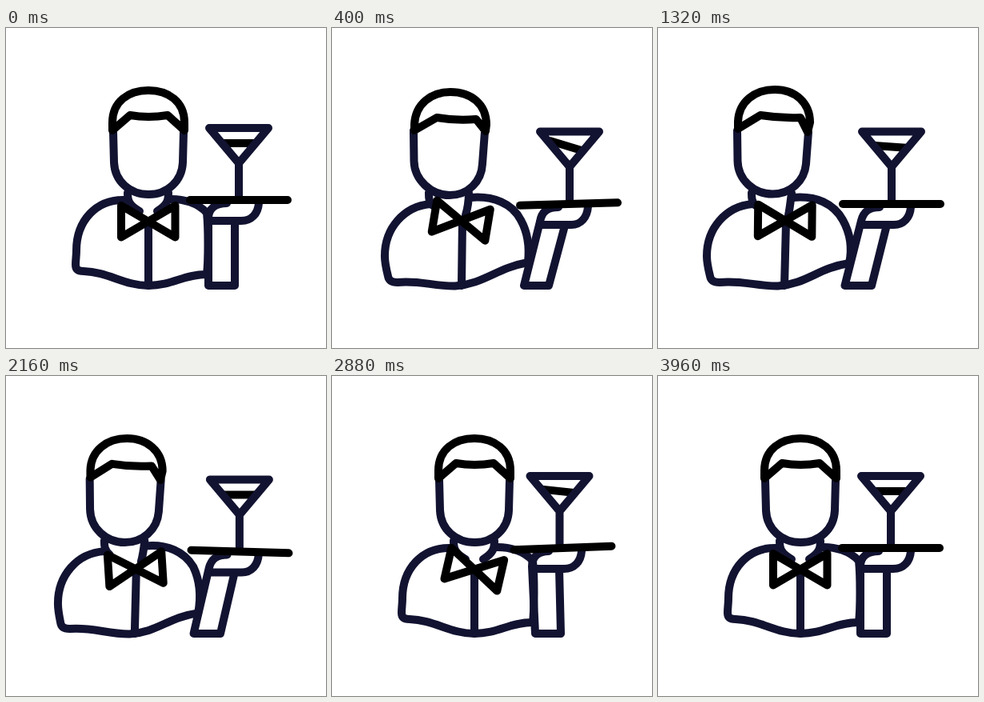
An HTML page without scripts for the animation above (4400 ms loop, 400 by 400 pixels).

```html
<!DOCTYPE html>
<html lang="en">
<head>
<meta charset="utf-8">
<title>Waiter</title>
<style>
html, body { margin: 0; width: 100%; height: 100%; overflow: hidden; background: #fff; }
svg { display: block; width: 100vw; height: 100vh; }
path, line {
  fill: none; stroke: #121331; stroke-width: 10;
  stroke-linecap: round; stroke-linejoin: round;
}
.dark { stroke: #000; }

/* Each part gives its own outline for: rest, going left, left, going back */
.pose  { animation: pose 4.4s infinite linear; }
.arm   { animation: arm 4.4s infinite linear; }
.glass { animation: glass 4.4s infinite ease-in-out; }
.tray  { animation: tray 4.4s infinite ease-in-out; }
.fluid { animation: slosh 4.4s infinite ease-in-out; transform-origin: 291px 144px; }
.tie   { animation: lean 4.4s infinite linear, swing 4.4s infinite ease-in-out; }

@keyframes pose {
  0%, 86.8%, 100% { d: var(--rest); }
  1.4%  { d: var(--rest); animation-timing-function: cubic-bezier(.35,.1,.7,.85); }
  9.1%  { d: var(--go); animation-timing-function: cubic-bezier(.2,.6,.6,1); }
  14.1% { d: var(--left); }
  46.8% { d: var(--left); animation-timing-function: cubic-bezier(.35,.1,.7,.85); }
  54.5% { d: var(--back); animation-timing-function: cubic-bezier(.2,.6,.6,1); }
  59.5% { d: var(--rest); }
}
@keyframes arm {
  0%, 72.7%, 100% { d: var(--rest); }
  1.4%  { d: var(--rest); }
  9.1%  { d: var(--go); animation-timing-function: ease-out; }
  14.1%, 15% { d: var(--far); animation-timing-function: ease-in-out; }
  27.3%, 48.5% { d: var(--left); }
  54.5% { d: var(--back); animation-timing-function: ease-out; }
  59.5%, 65.5% { d: var(--near); animation-timing-function: ease-in-out; }
}
@keyframes glass {
  0%, 1.4%, 72.7%, 100% { translate: 0 0; }
  9.1%  { translate: 6px 4.5px; animation-timing-function: ease-out; }
  14.1%, 15% { translate: 9px 5px; }
  27.3%, 48.5% { translate: 1px 4.5px; }
  54.5% { translate: -5px 1px; animation-timing-function: ease-out; }
  59.5%, 60.5% { translate: -8px 0; }
  65.5% { translate: -6.5px 0; }
}
@keyframes tray {
  0%, 1.4%, 72.7%, 100% { translate: 291px 215px; rotate: 0deg; }
  9.1%  { translate: 296px 220px; rotate: -1.6deg; }
  14.1%, 15% { translate: 300px 220px; rotate: 0deg; }
  27.3%, 46.8% { translate: 292px 220px; rotate: 0deg; }
  49.1% { translate: 292.5px 219.5px; rotate: 1.7deg; }
  54.5% { translate: 290px 216.5px; rotate: .5deg; }
  59.5% { translate: 287.5px 215px; rotate: -1.5deg; }
  65.5% { translate: 288.5px 215px; rotate: -2.2deg; }
}
@keyframes slosh {
  0%, 1.4%, 90%, 100% { rotate: 0deg; }
  9.1%  { rotate: 17deg; }
  20.5% { rotate: -10deg; }
  31.8% { rotate: 5deg; }
  38.6% { rotate: -3deg; }
  42.7%, 49.1% { rotate: 0deg; }
  55%   { rotate: 10deg; }
  65.5% { rotate: 6deg; }
  75%   { rotate: -11deg; }
  82.7% { rotate: 5deg; }
}
@keyframes lean {
  0%, 86.8%, 100% { translate: 178px 242px; }
  1.4%  { translate: 178px 242px; animation-timing-function: cubic-bezier(.35,.1,.7,.85); }
  9.1%  { translate: 161.5px 241px; animation-timing-function: cubic-bezier(.2,.6,.6,1); }
  14.1% { translate: 159px 241px; }
  46.8% { translate: 159px 241px; animation-timing-function: cubic-bezier(.35,.1,.7,.85); }
  54.5% { translate: 173px 243px; animation-timing-function: cubic-bezier(.2,.6,.6,1); }
  59.5% { translate: 178px 242px; }
}
@keyframes swing {
  0%, 86.8%, 100% { rotate: 0deg; }
  1.4%  { rotate: 0deg; animation-timing-function: linear; }
  7.7%  { rotate: 10deg; }
  20.5% { rotate: -13deg; }
  35%   { rotate: 5deg; }
  41.4% { rotate: 0deg; }
  46.8% { rotate: 0deg; animation-timing-function: linear; }
  53.2% { rotate: -10deg; }
  65.9% { rotate: 13deg; }
  80.5% { rotate: -5deg; }
}

#body {
  --rest: path("M150 215C112 213 88 242 88 278C88 284 87 290 87 296C87 302 91 304 97 304C128 305 148 322 178 322C208 322 222 308 250 308M203 214C222 213 240 219 251 231C253 250 253 290 251 308");
  --go: path("M123 220C90 223 66 250 66 285C66 293 68 302 70 310C71 316 75 318 82 318C108 315 128 323 154 322.500C190 320 206 300 245 293M172 212C202 209 226 220 236 240C245 256 247 275 245 293");
  --left: path("M118 220C85 223 61 250 61 285C61 293 63 302 65 310C66 316 70 318 77 318C104 315 124 323 150 322.500C186 320 200 300 239 294M168 212C198 209 220 220 231 240C240 256 243 275 239 294");
  --back: path("M142 216C102 215 79 246 79 282C79 288 79 294 79 300C79 306 83 309 89 309C118 308 140 322 171 322C202 322 214 307 243 305M197 214C215 213 232 218 245 232C249 250 247 280 244 305");
}
#seam {
  --rest: path("M178 322L178 245");
  --go: path("M162 322L163 244");
  --left: path("M158 322L160 244");
  --back: path("M171 322L173 245");
}
#neck {
  --rest: path("M152 206C152 215 153 221 167 229M203 206C203 215 202 221 189 229");
  --go: path("M121 206C121 212 121 217 126 222M171 206C171 214 170 224 167 234");
  --left: path("M117 206C117 212 117 217 122 222M167 206C166 214 165 224 163 234");
  --back: path("M144 206C144 214 145 221 157 228M196 206C196 212 195 217 190 225");
}
#face {
  --rest: path("M134 130L135 168C136 191 154 208 178.500 208C202 208 220 191 221 168L222 130");
  --go: path("M102 128L102.500 166C103 190 124 209 147 209C170 209 187 192 188 170L191 130");
  --left: path("M99 128L99.500 166C100 190 120 207.500 143 207.500C165 207.500 183 192 185 170L188 130");
  --back: path("M125 130L125 168C126 192 144 210 168 210C192 210 211 192 212 168L214 130");
}
#hair {
  --rest: path("M133 128L133 118C133 92 153 78 178 78C203 78 223 92 223 118L223 128L202 109Q178 113 155 109Z");
  --go: path("M103 128L103 121C104 95 124 80 148 80C174 80 193 95 193 121L192 129L180 114Q155 116 131 112Z");
  --left: path("M100 126L100 117C101 92 121 77 146 77C171 77 190 93 190 118L187 130L178 112Q153 113 128 109Z");
  --back: path("M125 129L125 121C125 96 145 82 170 82C195 82 216 96 216 121L215 130L196 114Q172 117 149 113Z");
}
#arm {
  --rest: path("M286 241L286 322L253 322L253 238C253 226 262 219 276 219M316 219C315 232 307 241 294 241L255 241");
  --go: path("M291 247L271 322L240 322L260 242C262 229 270 224 283 224M320 223C319 237 311 246 299 246L262 246");
  --far: path("M294 247L270 322L238 322L263 242C265 229 273 224 286 224M324 224C323 237 315 246 303 246L265 246");
  --left: path("M286 246L267 322L233.500 322L254 241C257 229 264 224 277 224M316 224C315 237 307 246 295 246L257 246");
  --back: path("M283 242L277 321L244 321L250 238C251 226 259 219 272 219M314 219C313 233 305 242 292 242L252 242");
  --near: path("M284 241L286 322L254 322L250 238C250 226 258 219 271 219M312 219C311 232 303 241 290 241L252 241");
}
</style>
</head>
<body>
<svg viewBox="0 0 400 400">
  <clipPath id="bowl"><path d="M250 123H332L291 173Z"/></clipPath>
  <path id="body" class="pose"/>
  <path id="seam" class="pose"/>
  <path id="neck" class="pose"/>
  <path id="face" class="pose"/>
  <path id="arm" class="arm"/>
  <g class="glass">
    <g clip-path="url(#bowl)"><line class="dark fluid" x1="266" y1="144" x2="316" y2="144"/></g>
    <path d="M254 125H328L291 169ZM291 169V213"/>
  </g>
  <line class="dark tray" x1="-61" x2="61"/>
  <path id="hair" class="dark pose"/>
  <path class="dark tie" d="M-34 -20L33.500 19.500V-20L-34 19.500Z"/>
</svg>
</body>
</html>
```
